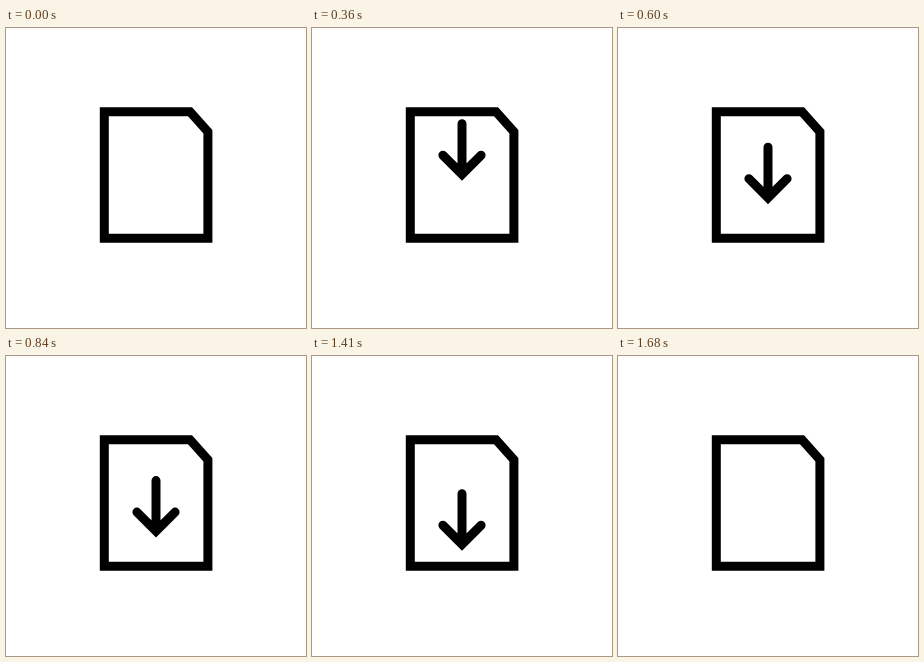
An HTML page for the animation above (1860 ms loop, 300 by 300 pixels).

```html
<!DOCTYPE html>
<html lang="en">
<head>
<meta charset="utf-8">
<title>Download</title>
<style>
  html, body { margin: 0; width: 100%; height: 100%; overflow: hidden; background: #fff; }
  svg { display: block; width: 100%; height: 100%; }
</style>
</head>
<body>
<svg viewBox="0 0 300 300" fill="none" stroke="#000" stroke-width="9" stroke-miterlimit="10">
  <defs>
    <path id="page" d="M98.3 83.7H184L201.9 103.8V210.3H98.3Z"/>
    <clipPath id="inside"><use href="#page"/></clipPath>
  </defs>
  <g clip-path="url(#inside)">
    <path id="arrow" stroke-linecap="round" d="M150 124.7V174M130.9 156.2L150 175.3L169.1 156.2"/>
  </g>
  <use href="#page"/>
</svg>
<script>
  const LOOP = 1860, STEP = 30;
  const ARRIVE = 925, LEAVE = 1110;
  const arrow = document.getElementById('arrow');

  // Cubic ease-out into the centre of the page, rest, cubic ease-in out of it.
  function offset(t) {
    if (t < ARRIVE) return -29 * ((ARRIVE - t) / 565) ** 3;
    if (t > LEAVE) return 13 * ((t - LEAVE) / 300) ** 3;
    return 0;
  }

  function draw() {
    const t = Math.floor((performance.now() % LOOP) / STEP) * STEP;
    arrow.setAttribute('transform', `translate(0 ${offset(t).toFixed(3)})`);
    requestAnimationFrame(draw);
  }
  draw();
</script>
</body>
</html>
```
